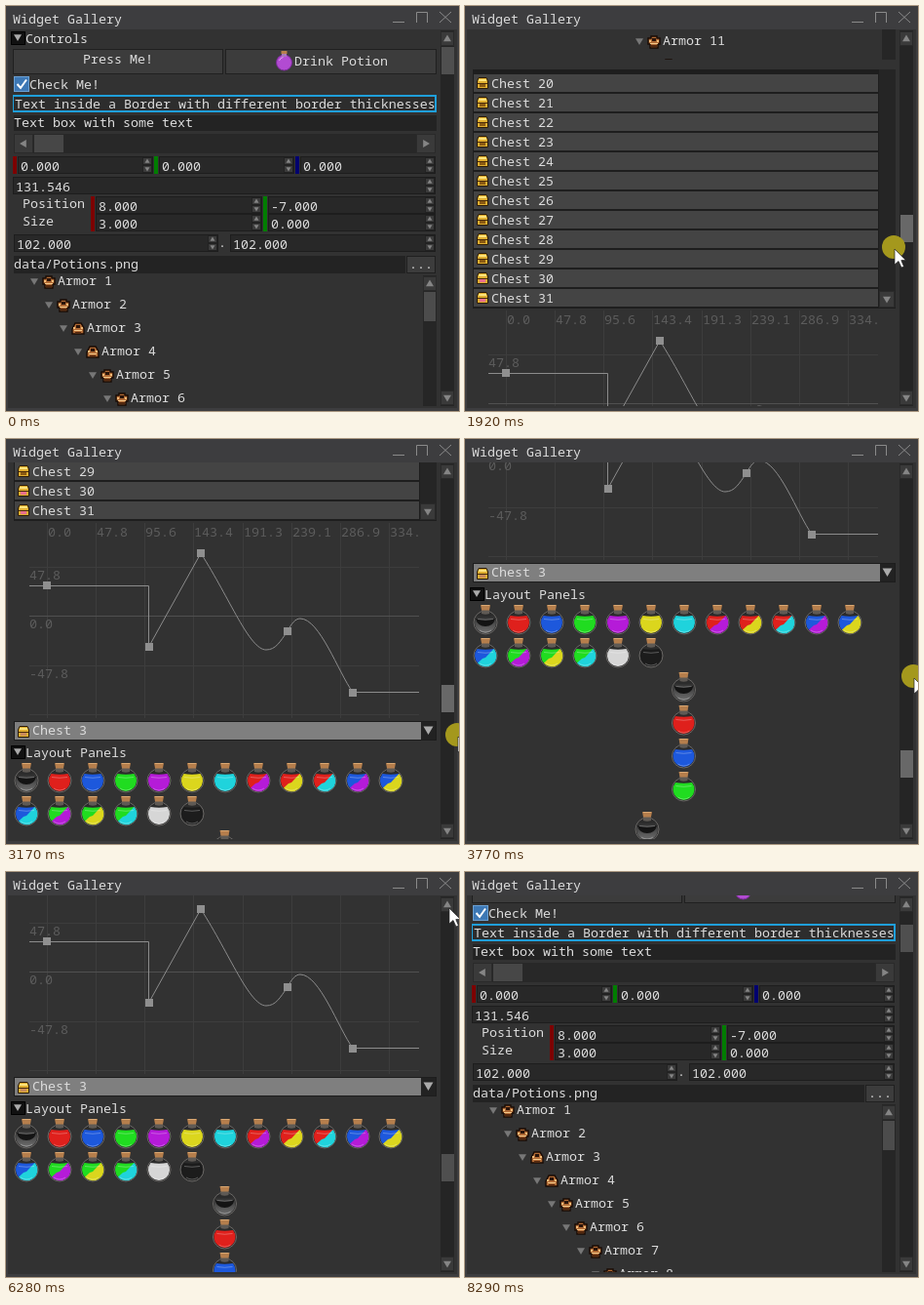
Animation, 465 px wide and 415 px high, one loop 8670 ms. Source, as an HTML page:

```html
<!DOCTYPE html>
<html lang="en">
<head>
<meta charset="utf-8">
<title>Widget Gallery</title>
<style>
  html, body { margin: 0; width: 100%; height: 100%; overflow: hidden; background: #3d3d3f; }
  svg { display: block; }
  text { font: 13.333px "Noto Sans Mono", "DejaVu Sans Mono", monospace; fill: #dcdcdc; white-space: pre; }
  .dim text { fill: #5c5c5c; }
</style>
</head>
<body>
<svg id="stage" width="465" height="415" viewBox="0 0 465 415"></svg>
<script>
const each = (n, fn) => Array.from({ length: n }, (_, i) => fn(i)).join('');

// Drawing helpers; text is placed by the middle of its capitals
const rect = (x, y, w, h, fill, more = '') =>
  `<rect x="${x}" y="${y}" width="${w}" height="${h}" fill="${fill}" ${more}/>`;
const box = (x, y, w, h, fill, edge) =>
  rect(x + .5, y + .5, w - 1, h - 1, fill, `stroke="${edge}"`);
const text = (x, y, s) => `<text x="${x}" y="${y + 5}">${s}</text>`;
const path = (d, fill, more = '') => `<path d="${d}" fill="${fill}" ${more}/>`;
const line = (d, color, more = '') => path(d, 'none', `stroke="${color}" ${more}`);
const at = (x, y, s) => `<g transform="translate(${x} ${y})">${s}</g>`;
const arrow = (x, y, r, turn = 0, fill = '#858585') =>
  path(`M${-r} ${-r * .7}H${r}L0 ${r}Z`, fill, `transform="translate(${x} ${y}) rotate(${turn})"`);
const clip = (id, x, y, w, h) => `<clipPath id="${id}">${rect(x, y, w, h, '#000')}</clipPath>`;
const clipped = (id, s) => `<g clip-path="url(#${id})">${s}</g>`;

const arrowButton = (x, y, w, h, turn) =>
  box(x, y, w, h, '#3a3a3a', '#2a2a2a') + arrow(x + w / 2, y + h / 2, 4, turn);
const pushButton = (x, y, w, h) => box(x, y, w, h, '#3c3c3c', '#202020');
const header = (y, label) =>
  box(5, y - 7, 15, 14, '#111', '#000') + arrow(12, y - 1, 4, 0, '#aaa') + text(20, y, label);

function spinner(x, y, w, value, bar) {
  const h = 18, right = x + w - 11;
  return (bar ? rect(x - 5, y, 4, h, bar) : '') +
    box(x, y, w, h, '#282828', '#1d1d1d') + text(x + 3, y + h / 2 + .5, value) +
    box(right, y + 1, 10, h / 2 - 1, '#3b3b3b', '#222') +
    box(right, y + h / 2, 10, h / 2 - 1, '#3b3b3b', '#222') +
    arrow(right + 5, y + h * .28, 2.5, 180) + arrow(right + 5, y + h * .72, 2.5);
}

// Icons
const AXES = ['#7d0000', '#007d00', '#00006e'];
const WARM = ['#df201c', '#1d58dc', '#20dc20'];
const BRIGHT = ['#b51bd8', '#dbd61d', '#1fd3dc'];
const GLASS = ['url(#glass)'];
const mixes = [
  GLASS, ...[...WARM, ...BRIGHT].map(c => [c]),
  ...WARM.flatMap(a => BRIGHT.map(b => [a, b])), ['#d6d6d6'], ['#1c1c1c']
];

const flask = (x, y, [a, b]) => at(x, y,
  '<circle r="12" fill="#2b2b2b" stroke="#696765"/>' +
  path('M-8.5 -7Q0 -5.5 8.5 -7A11 11 0 1 1 -8.5 -7Z', a) +
  (b ? path('M-8 7.6L-3 3L0 2L8.5 -7A11 11 0 0 1 -8 7.6Z', b) : '') +
  (a === GLASS[0] ? path('M-10 -4Q0 -1 10 -4Q8 4 0 4Q-8 4 -10 -4Z', '#141414') : '') +
  line('M-8 -3.5Q0 -2 8 -3.5M-6 8Q0 12 6 8', '#fff', 'stroke-opacity=".28"') +
  path('M-4 -14H4V-9Q0 -7.5 -4 -9Z', '#5f5a55') +
  path('M-5 -18H5L4 -12.5H-4Z', '#b57e4c') + line('M-4 -17.5H4', '#d9a873'));

const smallFlask = at(285.5, 58,
  '<circle r="8" fill="#b24bd2" stroke="#792b96"/>' +
  path('M-2.5 -10H2.5V-6H-2.5Z', '#a779ba') + path('M-3 -12H3V-9H-3Z', '#b9814b') +
  line('M-5 -2Q-4 -5 -1 -5.5', '#e0a6ee'));

const armor = (x, y, hood) => at(x, y,
  path(hood ? 'M-3 -6H3L6 -1V5H-6V0Z' : 'M-3 -6H3V-4H6V2H4V6H-4V2H-6V-4H-3Z',
    '#b06a35', 'stroke="#180b05" stroke-width="1.4"') +
  rect(-2, -4, 4, 3, '#2a140a') + rect(-4, 1, 8, 1, '#f4c98a') + rect(-3, 3, 6, 2, '#54290f') +
  rect(-5, -2, 2, 2, '#f0bb78') + rect(3, -2, 2, 2, '#f0bb78'));

const chest = (x, y, lock) => at(x, y,
  path('M-5.5 -2L-4 -5.5H4L5.5 -2V5.5H-5.5Z', '#dfae30', 'stroke="#2a1a08"') +
  rect(-4, -4, 8, 2, '#ffe47c') + rect(-5, 0, 10, 1, '#4a2b0a') + rect(-3, 1, 6, 3, lock));

// Upper part of the page
function controls() {
  const tree = each(12, i => {
    const x = 29 + 15 * i, y = 282 + 24 * i;
    return arrow(x, y, 4, 0, '#777') + armor(x + 15, y + 1, i === 2 || i === 3) +
      text(x + 24, y - 1, `Armor ${i + 1}`);
  });
  return header(33, 'Controls') +
    pushButton(7, 44, 216, 26) + text(79, 54, 'Press Me!') +
    pushButton(225, 44, 217, 26) + smallFlask + text(296, 56, 'Drink Potion') +
    box(8, 72, 16, 16, '#3d78b5', '#6ba0d2') +
    line('M11.5 80L15 84L21 75.5', '#fff', 'stroke-width="2"') + text(24, 80, 'Check Me!') +
    rect(7, 91, 435, 18, '#1f9fda') + rect(8, 93, 432, 14, '#2d2d2d') +
    text(9, 100, 'Text inside a Border with different border thicknesses') +
    rect(8, 112, 434, 16, '#232323') + text(8, 119, 'Text box with some text') +
    rect(8, 131, 433, 20, '#282828') + arrowButton(8, 131, 20, 20, 90) +
    rect(29, 132, 30, 18, '#474747') + arrowButton(421, 131, 20, 20, -90) +
    each(3, i => spinner(12 + 145 * i, 154, 139, '0.000', AXES[i])) +
    spinner(7, 175, 434, '131.546') +
    ['Position', 'Size'].map((label, i) => text(17, 202 + 18 * i, label) +
      spinner(92, 195 + 18 * i, 171, i ? '3.000' : '8.000', AXES[0]) +
      spinner(269, 195 + 18 * i, 172, i ? '0.000' : '-7.000', AXES[1])).join('') +
    spinner(8, 234, 210, '102.000') + text(218, 242, '.') + spinner(230, 234, 211, '102.000') +
    rect(8, 256, 402, 18, '#232323') + text(8, 264, 'data/Potions.png') +
    pushButton(411, 256, 30, 18) + text(414, 264, '...') +
    clipped('tree', tree) + rect(428, 276, 14, 265, '#262626') +
    arrowButton(428, 277, 14, 15, 180) + rect(429, 293, 12, 30, '#4c4c4c');
}

// Lower part of the page
function chart() {
  const unit = 47.815;
  const colX = i => Math.round(42 + 50.15 * i);
  const rowY = i => Math.round(132 + 50.3 * i);
  const dots = [[42, 151], [147, 214], [200, 118], [289, 198], [356, 261]];
  return clipped('chart',
    each(8, i => rect(colX(i), 87, 1, 200, '#3d3d3d')) +
    each(4, i => rect(24, rowY(i), 400, 1, i === 1 ? '#505050' : '#3d3d3d')) +
    `<g class="dim">${each(8, i => text(colX(i) + 1, 96, (unit * i).toFixed(1)))}` +
    `${each(4, i => text(24, rowY(i) + 8, (unit * (1 - i)).toFixed(1)))}</g>` +
    line('M24 151.5H146.5V214L200 118C230 165 250 217 267 217C277 217 281 209 289 198' +
      'C293 190 297 185 302 185C322 185 341 240 356 260.5H424', '#8c8c8c') +
    dots.map(([x, y]) => rect(x - 4, y - 4, 8, 8, '#8f8f8f')).join(''));
}

function panels() {
  const list = rect(8, -160, 434, 245, '#1e1e1e') + each(12, i => {
    const y = 74 - 20 * i;
    return rect(9, y - 9, 415, 18, '#444') + chest(18, y, i < 2 ? '#e86f8c' : '#8a5a12') +
      text(27, y, `Chest ${31 - i}`);
  }) + rect(425, -160, 17, 244, '#252525') + arrowButton(425, 67, 16, 17, 0);
  const combo = box(8, 290, 434, 20, '#7f7f7f', '#1d1d1d') + rect(426, 291, 15, 18, '#222') +
    arrow(433.5, 299, 5, 0, '#aaa') + chest(18, 301, '#c98a5a') + text(27, 299, 'Chest 3');
  return list + chart() + combo + header(322, 'Layout Panels') +
    mixes.map((mix, i) => flask(21 + 34 * (i % 12), 351 + 34 * Math.floor(i / 12), mix)).join('') +
    each(4, i => flask(224.5, 420 + 34 * i, mixes[i])) +
    each(2, i => flask(187 - 2 * i, 563 + 43 * i, GLASS));
}

document.getElementById('stage').innerHTML =
  '<defs>' + clip('view', 4, 24, 440, 386) + clip('tree', 8, 276, 420, 265) +
  clip('chart', 24, 87, 400, 200) +
  '<linearGradient id="glass" x2="0" y2="1"><stop stop-color="#2c2c2c"/>' +
  '<stop offset="1" stop-color="#707070"/></linearGradient></defs>' +
  rect(0, 0, 465, 415, '#3d3d3f') + rect(2, 24, 461, 388, '#323232') +
  text(7, 13, 'Widget Gallery') +
  line('M397 16.5H409M421.5 17V6.5H432.5V17M445 6L457 17M457 6L445 17', '#8a8a8a') +
  clipped('view', `<g id="page">${controls()}${at(0, 711, panels())}</g>`) +
  rect(446, 25, 14, 385, '#252525') + arrowButton(446, 26, 14, 15, 180) +
  arrowButton(446, 394, 14, 15, 0) + rect(447, 42, 13, 28, '#4c4c4c', 'id="thumb"') +
  '<g id="pointer"><circle id="press" cx="-1" cy="-2" r="12" fill="#a4981d"/>' +
  path('M0 0V16L4 12.5L7 19L9.5 18L6.8 11.6H11.5Z', '#fff', 'stroke="#222" stroke-width=".7"') + '</g>';

// Motion: each move eases out from wherever the last one ended
const LOOP = 8670;
const STEP = LOOP / 112;
const BOTTOM = 930;

const scrollMoves = [
  [690, 1350, BOTTOM], [1700, 2550, 0], [2690, 3628, BOTTOM],
  [3628, 4320, 797], [5230, 6510, 790.5], [7050, 8200, 38]
];
const pointerMoves = [
  [150, 300, 454, 83], [300, 460, 454, 66], [760, 1540, 432, 405], [1700, 2690, 454, 32],
  [2690, 3540, 466, 367], [3620, 4320, 454, 85], [4490, 4720, 455, 43], [4870, 5100, 455, 37],
  [6510, 6970, 453, 302], [7120, 7830, 455, 60]
];

function follow(home, moves, t) {
  return moves.reduce((pos, [from, to, ...goal]) => {
    const p = Math.min(1, Math.max(0, (t - from) / (to - from)));
    const eased = 1 - (1 - p) ** 2;
    return pos.map((v, i) => v + (goal[i] - v) * eased);
  }, home);
}

const between = (t, a, b) => t >= a && t < b;
const [page, thumb, pointer, press] =
  ['page', 'thumb', 'pointer', 'press'].map(id => document.getElementById(id));

function draw(now) {
  const frame = Math.floor((now % LOOP + 25) / STEP);
  const t = frame * STEP;
  const [scroll] = follow([0], scrollMoves, t);
  // The thumb trails the page a little
  const [trail] = follow([0], scrollMoves, t - 40);
  const [x, y] = follow([449, 360], pointerMoves, t);
  const visible = between(t, 70, 140) || between(t, 300, 7970);
  const dragging = between(t, 760, 4490) || between(t, 7110, 7970);
  const tapping = between(t, 4860, 6500) && frame % 3 === 1;

  page.setAttribute('transform', `translate(0 ${-Math.round(scroll)})`);
  thumb.setAttribute('y', Math.round(42 + trail / 3.2));
  thumb.setAttribute('fill', dragging ? '#686868' : '#4f4f4f');
  pointer.setAttribute('visibility', visible ? 'visible' : 'hidden');
  pointer.setAttribute('transform', `translate(${Math.round(x)} ${Math.round(y)})`);
  press.setAttribute('opacity', dragging || tapping ? 1 : 0);
}

const start = performance.now();
function loop() {
  draw(performance.now() - start);
  requestAnimationFrame(loop);
}
loop();
</script>
</body>
</html>
```
